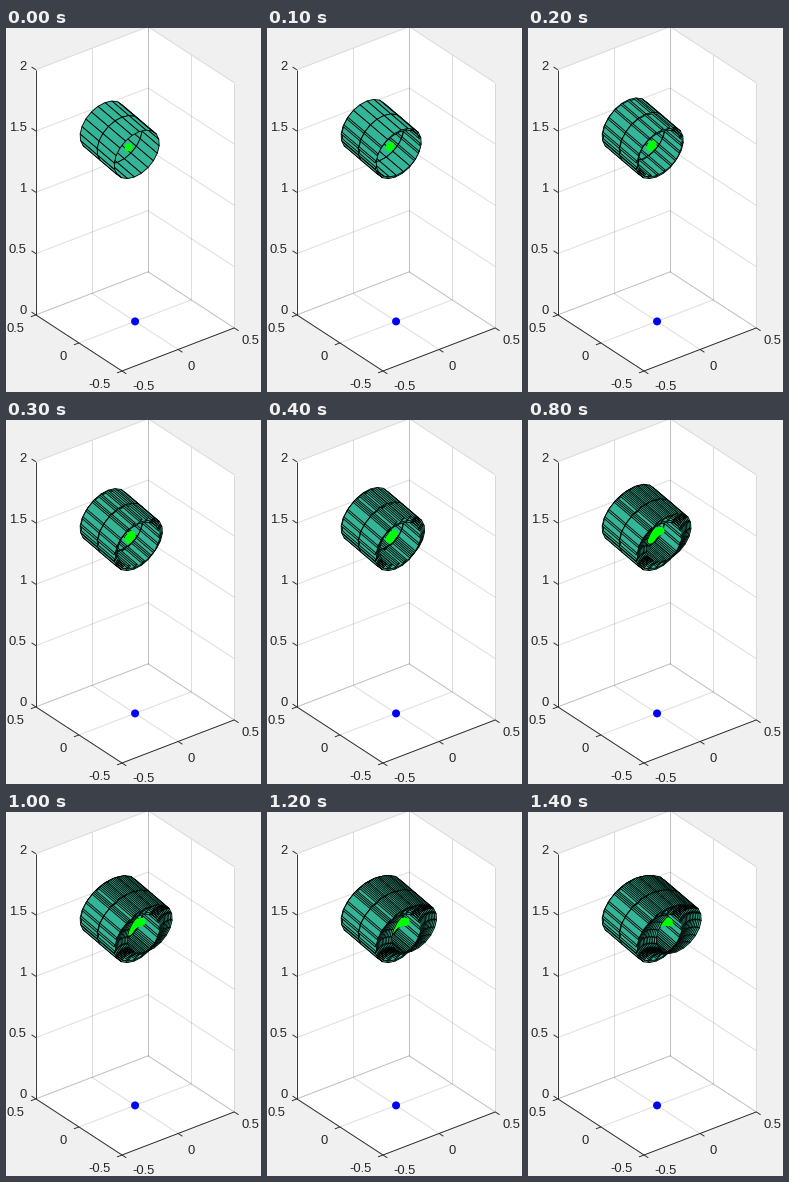
A matplotlib script that plays this animation: 255 px wide and 364 px high, repeating every 1.5 s.

```python
import numpy as np
import matplotlib.pyplot as plt
from matplotlib.animation import FuncAnimation
from matplotlib.collections import PolyCollection

W, H, DPI = 255, 364, 72
FRAMES, INTERVAL = 15, 100
SCALE = 141.5                      # pixels per data unit
CORNER = np.array([116.0, 343.0])  # pixel of the nearest floor corner
INK = (0.15, 0.15, 0.15)
TEAL = (52 / 255, 181 / 255, 151 / 255)
GREEN = (0, 1, 0)

# Orthographic camera
az, el = np.radians(-37.5), np.radians(30)
RIGHT = np.array([np.cos(az), np.sin(az), 0])
TOWARD = np.array([np.sin(az) * np.cos(el), -np.cos(az) * np.cos(el), np.sin(el)])
UP = np.cross(TOWARD, RIGHT)


def project(points):
    p = np.asarray(points, float) + [0.5, 0.5, 0]
    return CORNER + SCALE * np.stack([p @ RIGHT, -(p @ UP)], axis=-1)


plt.rcParams["font.family"] = "Liberation Sans"
fig = plt.figure(figsize=(W / DPI, H / DPI), dpi=DPI, facecolor=(0.941,) * 3)
ax = fig.add_axes([0, 0, 1, 1])
ax.set_xlim(0, W)
ax.set_ylim(H, 0)
ax.axis("off")


def segment(a, b, **style):
    pts = project([a, b])
    ax.plot(pts[:, 0], pts[:, 1], solid_capstyle="butt", **style)


def draw_box():
    lo, hi, top = -0.5, 0.5, 2
    walls = [
        [(lo, lo, 0), (hi, lo, 0), (hi, hi, 0), (lo, hi, 0)],
        [(lo, hi, 0), (hi, hi, 0), (hi, hi, top), (lo, hi, top)],
        [(hi, lo, 0), (hi, hi, 0), (hi, hi, top), (hi, lo, top)],
    ]
    ax.add_collection(PolyCollection([project(w) for w in walls],
                                     facecolors="white", edgecolors="white",
                                     linewidths=0.5, zorder=0))
    grid = dict(color=INK, alpha=0.15, lw=1, zorder=1)
    for v in (lo, 0, hi):
        segment((v, lo, 0), (v, hi, 0), **grid)
        segment((lo, v, 0), (hi, v, 0), **grid)
        segment((v, hi, 0), (v, hi, top), **grid)
        segment((hi, v, 0), (hi, v, top), **grid)
    for z in np.arange(0, 2.1, 0.5):
        segment((lo, hi, z), (hi, hi, z), **grid)
        segment((hi, lo, z), (hi, hi, z), **grid)

    line = dict(color=INK, lw=0.9, zorder=2)
    segment((lo, hi, 0), (lo, hi, top), **line)
    segment((lo, lo, 0), (lo, hi, 0), **line)
    segment((lo, lo, 0), (hi, lo, 0), **line)
    tick = 0.05
    for v in (lo, 0, hi):
        segment((v, lo, 0), (v, lo - tick, 0), **line)
        segment((lo, v, 0), (lo - tick * 0.9, v, 0), **line)
    for z in np.arange(0, 2.1, 0.5):
        segment((lo, hi, z), (lo, hi + tick, z), **line)


def label(x, y, text, ha):
    ax.text(x, y, text, ha=ha, va="center", fontsize=13, color=INK, zorder=3)


def draw_labels():
    for i, text in enumerate(("0", "0.5", "1", "1.5", "2")):
        label(20.5, 283.5 - 61.2 * i, text, "right")
    for x, y, text in ((18.5, 300.5, "0.5"), (61, 328.5, "0"), (104.5, 356.5, "-0.5")):
        label(x, y, text, "right")
    for x, y, text in ((126, 358.5, "-0.5"), (181, 338.5, "0"), (235, 313.5, "0.5")):
        label(x, y, text, "left")


# Cylinder in its own frame
RADIUS, LENGTH, SIDES = 0.2, 0.4, 20
tilt = np.radians(8)
AXIS = np.array([0, -np.cos(tilt), -np.sin(tilt)])
SIDE = np.array([1.0, 0, 0])
TOP = np.array([0, -np.sin(tilt), np.cos(tilt)])
phi = np.linspace(0, 2 * np.pi, SIDES + 1)
RING = RADIUS * (np.outer(np.cos(phi), SIDE) + np.outer(np.sin(phi), TOP))
disc = np.linspace(0, 2 * np.pi, 24, endpoint=False)
DOT = 4 * np.stack([np.cos(disc), np.sin(disc)], axis=1)


def center(n):
    return np.array([-0.137 + 0.00846 * n + 0.000303 * n**2,
                     0,
                     1.53 + 0.0109 * n - 0.00072 * n**2])


def parts(n):
    """Depth, outline, fill and line width of each piece of one cylinder."""
    c = center(n)
    rings = [c + RING + AXIS * d for d in (-LENGTH / 2, 0, LENGTH / 2)]
    out = []
    for a, b in zip(rings, rings[1:]):
        for k in range(SIDES):
            quad = np.array([a[k], a[k + 1], b[k + 1], b[k]])
            out.append((quad.mean(axis=0) @ TOWARD, project(quad), TEAL, 0.85))
    mark = c + 0.105 * AXIS
    out.append((mark @ TOWARD, project(mark) + DOT, GREEN, 0))
    return out


draw_box()
draw_labels()
origin = project([0, 0, 0])
ax.add_patch(plt.Circle(origin, 4, fc=(0, 0, 1), ec="none", zorder=4))
trail = PolyCollection([], edgecolors="black", joinstyle="round", zorder=5)
ax.add_collection(trail)


def update(frame):
    # Every earlier pose stays; paint from far to near
    pieces = [p for n in range(frame + 1) for p in parts(n)]
    pieces.sort(key=lambda p: p[0])
    trail.set_verts([p[1] for p in pieces])
    trail.set_facecolor([p[2] for p in pieces])
    trail.set_linewidth([p[3] for p in pieces])
    return (trail,)


anim = FuncAnimation(fig, update, frames=FRAMES, interval=INTERVAL,
                     repeat=True, repeat_delay=0, blit=False)
plt.show()
```
